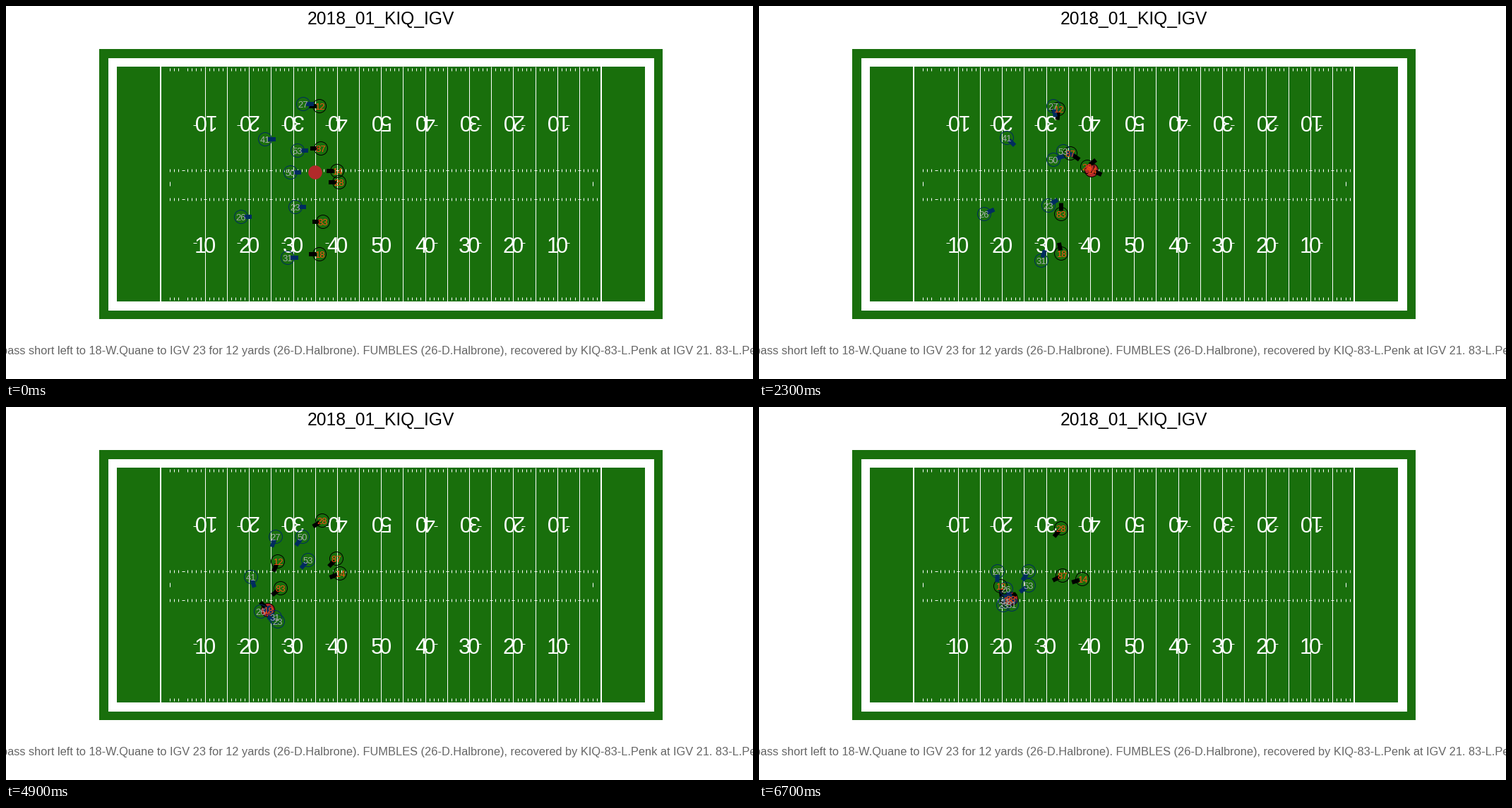
Animation, 1058 px wide and 529 px high, one loop 6.8 s. Source, as a matplotlib script:

```python
import numpy as np
import matplotlib.pyplot as plt
from matplotlib.animation import FuncAnimation
from matplotlib.collections import LineCollection
from matplotlib.patches import Circle, Rectangle

W, H, DPI = 1058, 529, 64
PX = 72 / DPI  # points per pixel
FRAMES, STEP = 68, 100
GREEN, NAVY, GREY = "#196f0c", "#002c5f", "#a5acaf"
BLACK, ORANGE, BROWN = "#000000", "#fb4f14", "#b22a2a"
MID, YARD = 531.3, 6.237

plt.rcParams["font.family"] = "Liberation Sans"
fig = plt.figure(figsize=(W / DPI, H / DPI), dpi=DPI, facecolor="white")
ax = fig.add_axes([0, 0, 1, 1])
ax.set_xlim(0, W)
ax.set_ylim(H, 0)
ax.axis("off")


def yard_x(yard):
    return MID + (yard - 60) * YARD


def rect(x0, y0, x1, y1, color):
    ax.add_patch(Rectangle((x0, y0), x1 - x0, y1 - y0, fc=color, ec="none", zorder=0))


def strokes(segs, width=1):
    ax.add_collection(LineCollection(segs, colors="white", linewidths=width * PX,
                                     capstyle="butt", zorder=1))


def label(x, y, text, px, color, **kw):
    kw = {"ha": "center", "va": "baseline", "zorder": 2, **kw}
    return ax.text(x, y, text, fontsize=px * PX, color=color, **kw)


def draw_field():
    rect(132, 61, 930, 444, GREEN)
    rect(145, 74, 918, 432, "white")
    rect(157, 86, 905, 419, GREEN)
    strokes([[(yard_x(n), 86), (yard_x(n), 419)] for n in (10, 110)], 2)
    strokes([[(yard_x(n), 86), (yard_x(n), 419)] for n in range(20, 110, 5)])

    ticks = []
    for n in range(12, 110):
        x = yard_x(n)
        if n % 5:
            ticks += [[(x, y - 2), (x, y + 2)] for y in (90, 233, 274, 415)]
        else:
            ticks += [[(x - 2, y), (x + 2, y)] for y in (233, 274)]
    ticks += [[(yard_x(n), 249), (yard_x(n), 255)] for n in (12, 108)]
    strokes(ticks)

    for n in range(20, 101, 10):
        x = yard_x(n)
        first = str(5 - abs(n - 60) // 10)
        for digit, dx in ((first, -6.2), ("0", 6.2)):
            label(x + dx, 350, digit, 31, "white")
            label(x - dx - 1, 154, digit, 31, "white", rotation=180, rotation_mode="anchor")
        side = np.sign(n - 60)
        if side:
            strokes([[(x + side * 12, y), (x + side * 17, y)] for y in (169, 336)])


def ramp(t, start, end):
    return np.clip((t - start) / (end - start), 0, 1)


# Moments every route passes through: set, snap taken, catch, tackle, end
KEYS = np.array([8, 23, 40, 49, 67])


class Player:
    def __init__(self, number, side, *route):
        self.side = side
        self.route = np.array(route, float)
        self.slope = np.gradient(self.route, KEYS, axis=0)
        self.slope[0] = 0
        line, ink, z = (NAVY, GREY, 5) if side > 0 else (BLACK, ORANGE, 4)
        self.ring = ax.add_patch(Circle((0, 0), 9.5, fill=False, ec=line, lw=PX, zorder=z))
        self.stub, = ax.plot([], [], color=line, lw=6 * PX, solid_capstyle="butt", zorder=z)
        self.text = label(0, 0, str(number), 13, ink, zorder=z + 3)

    def at(self, t):
        """Cubic Hermite curve along the route."""
        t = np.clip(t, KEYS[0], KEYS[-1])
        i = min(np.searchsorted(KEYS, t, side="right") - 1, len(KEYS) - 2)
        h = KEYS[i + 1] - KEYS[i]
        u = (t - KEYS[i]) / h
        p, m = self.route, self.slope * h
        return (p[i] + (p[i + 1] - p[i]) * u * u * (3 - 2 * u)
                + u * (1 - u) * ((1 - u) * m[i] - u * m[i + 1]))

    def facing(self, t, target):
        """Turn from the line of scrimmage to the ball, leaning into the run."""
        to_ball = target - self.at(t)
        to_ball /= np.hypot(*to_ball) + 1
        run = (self.at(t + 1) - self.at(t - 1)) / 2
        w = ramp(t, 8, 23)
        look = (1 - w) * np.array([self.side, 0]) + w * to_ball + 0.4 * run
        return look / (np.hypot(*look) + 1e-6)

    def place(self, t, target):
        pos = self.at(t)
        ends = pos + np.outer([4.5, 15.5], self.facing(t, target))
        self.ring.center = pos
        self.stub.set_data(ends[:, 0], ends[:, 1])
        self.text.set_position(pos + [0, 5])


draw_field()
label(531, 26, "2018_01_KIQ_IGV", 24.6, "black")
label(-7, 494,
      "pass short left to 18-W.Quane to IGV 23 for 12 yards (26-D.Halbrone). "
      "FUMBLES (26-D.Halbrone), recovered by KIQ-83-L.Penk at IGV 21. 83-L.Penk",
      16.4, "#666666", ha="left")

SPOT = np.array([438, 236])
ball = ax.add_patch(Circle(SPOT, 9.8, fc=BROWN, ec="none", zorder=3))

passer = Player(14, -1, (469, 234), (471, 233), (477, 238), (473, 236), (458, 244))
catcher = Player(18, -1, (444, 352), (428, 351), (393, 313), (371, 288), (352, 274))
rescuer = Player(83, -1, (449, 306), (428, 295), (405, 257), (389, 257), (357, 272))
players = [
    passer, catcher, rescuer,
    Player(12, -1, (444, 142), (424, 146), (397, 191), (385, 219), (342, 254)),
    Player(87, -1, (446, 202), (441, 209), (465, 206), (468, 215), (430, 239)),
    Player(28, -1, (472, 250), (465, 228), (456, 173), (448, 161), (428, 172)),
    Player(27, 1, (421, 139), (417, 142), (395, 159), (382, 184), (338, 233)),
    Player(41, 1, (367, 189), (351, 187), (339, 207), (347, 241), (349, 276)),
    Player(53, 1, (413, 205), (431, 206), (440, 201), (428, 217), (382, 253)),
    Player(50, 1, (403, 236), (417, 218), (433, 177), (420, 184), (382, 233)),
    Player(23, 1, (410, 285), (410, 283), (408, 298), (385, 304), (346, 281)),
    Player(26, 1, (333, 299), (319, 295), (333, 299), (361, 290), (350, 258)),
    Player(31, 1, (399, 357), (400, 361), (392, 323), (381, 298), (358, 280)),
]


def ball_at(t):
    """Snap to the passer, throw to the catcher, fumble to the rescuer."""
    pos = SPOT
    for owner, start, end in ((passer, 12, 18), (catcher, 30, 39), (rescuer, 57, 63)):
        pos = pos + (owner.at(t) - pos) * ramp(t, start, end)
    return pos


def update(t):
    pos = ball_at(t)
    ball.center = pos
    for p in players:
        p.place(t, pos)
    return []


anim = FuncAnimation(fig, update, frames=FRAMES, init_func=lambda: update(0),
                     interval=STEP, repeat=True, repeat_delay=0, blit=False)
plt.show()
```
